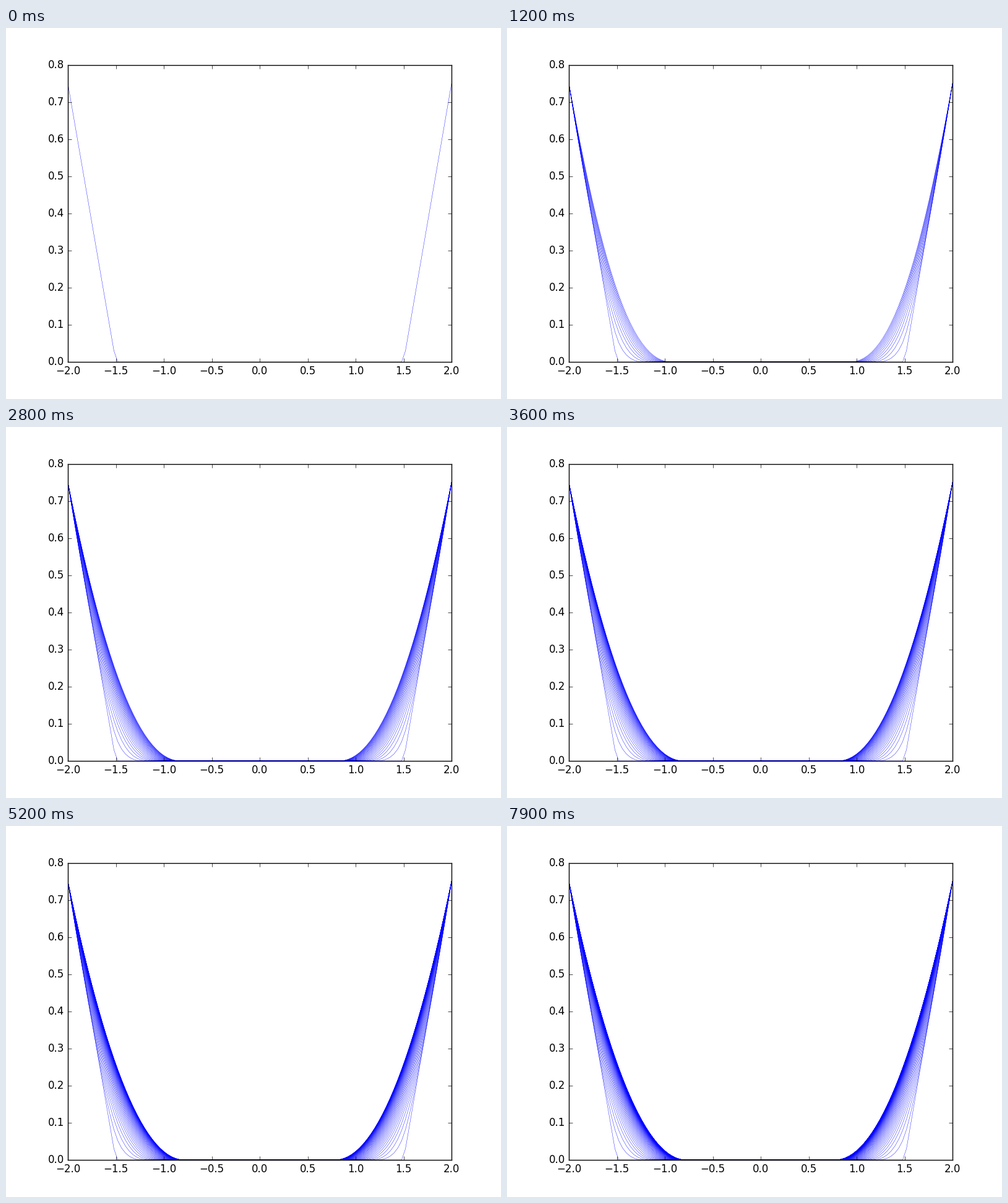
Recreate the animation shown at these times as a matplotlib script. Size 800 by 600 pixels, loop 8000 ms.

```python
import numpy as np
import matplotlib.pyplot as plt
from matplotlib.animation import FuncAnimation

plt.style.use("classic")

FRAMES = 80
INTERVAL = 100
DT = 0.01

x = np.linspace(-2, 2, 101)
dx = x[1] - x[0]
r = DT / dx**2
inner = len(x) - 2
A = ((1 + 2 * r) * np.eye(inner)
     - r * (np.eye(inner, k=1) + np.eye(inner, k=-1)))


def step(u):
    """Implicit step of u_t = u_xx - 1 kept above the obstacle u = 0."""
    b = u[1:-1] - DT
    b[0] += r * u[0]
    b[-1] += r * u[-1]
    free = np.ones(inner, bool)
    for _ in range(60):
        v = np.zeros(inner)
        v[free] = np.linalg.solve(A[np.ix_(free, free)], b[free])
        new = np.where(free, v > 0, A @ v < b)
        if np.array_equal(new, free):
            break
        free = new
    out = u.copy()
    out[1:-1] = np.maximum(v, 0)
    return out


curves = [np.maximum(1.5 * (np.abs(x) - 1.5), 0)]
while len(curves) < FRAMES:
    curves.append(step(curves[-1]))

fig = plt.figure(figsize=(8, 6), dpi=100, facecolor="white")
ax = fig.add_axes([0.125, 0.1, 0.775, 0.8])
ax.set_xlim(-2, 2)
ax.set_ylim(0, 0.8)
ax.set_xticks(np.linspace(-2, 2, 9))
ax.set_yticks(np.linspace(0, 0.8, 9))

lines = [ax.plot(x, u, color="b", lw=0.3)[0] for u in curves]


def draw(i):
    for k, line in enumerate(lines):
        line.set_visible(k <= i)
    return lines


anim = FuncAnimation(fig, draw, frames=FRAMES, interval=INTERVAL,
                     init_func=lambda: draw(0), repeat=True, repeat_delay=0)
plt.show()
```
